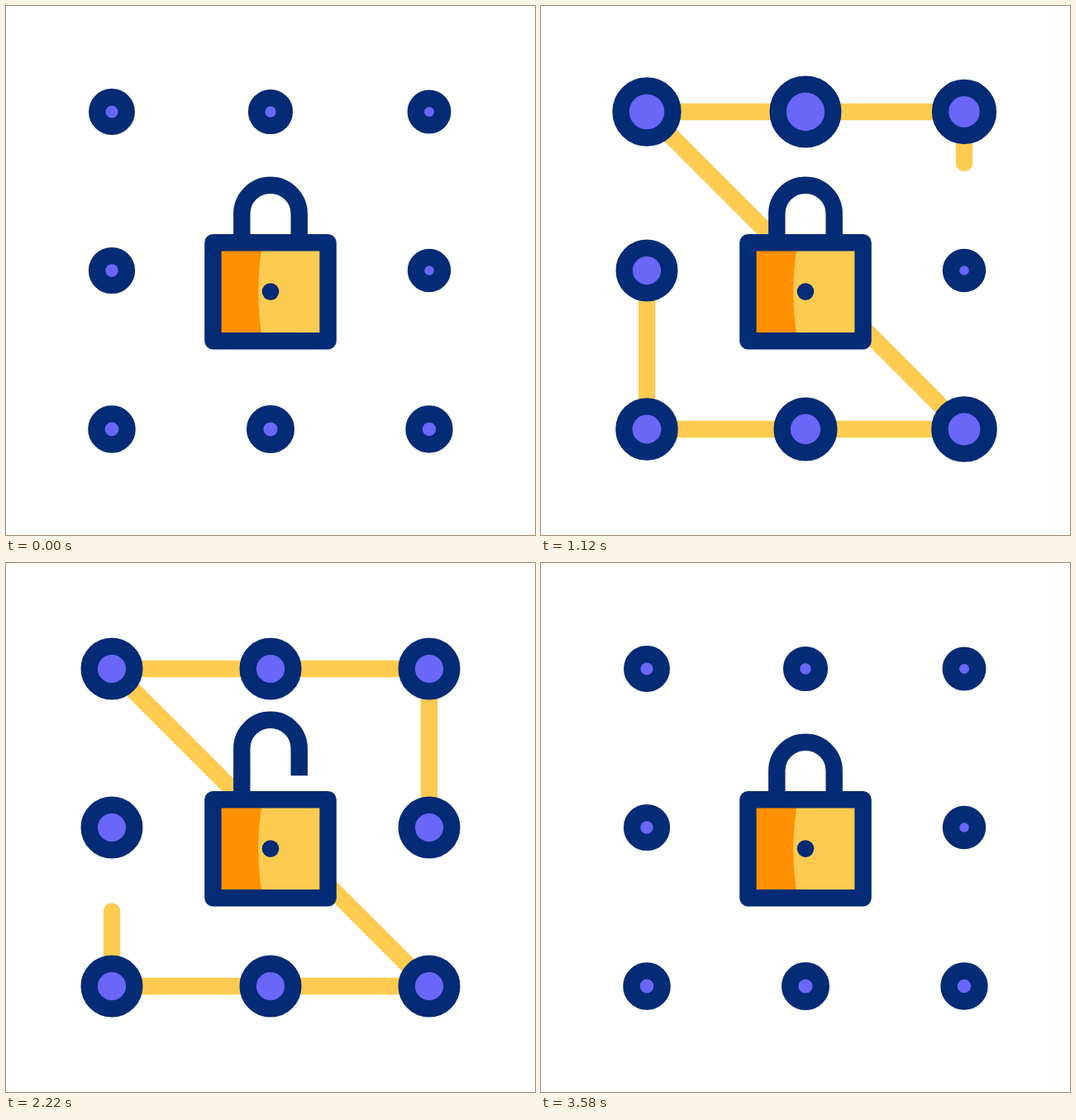
Recreate the animation shown at these times as an HTML page with a canvas. Size 640 px wide and 640 px high, loop 3600 ms.

```html
<!DOCTYPE html>
<html lang="en">
<head>
<meta charset="utf-8">
<title>Pattern unlock</title>
<style>
html, body { margin: 0; width: 100%; height: 100%; overflow: hidden; background: #fff; }
canvas { display: block; width: 640px; height: 640px; }
</style>
</head>
<body>
<canvas id="stage" width="640" height="640"></canvas>
<script>
const ctx = document.getElementById('stage').getContext('2d');
const LOOP = 3600, STROKE = 20.4, ON = 37.5;
const NAVY = '#042b75', PURPLE = '#6a66f8', YELLOW = '#fdcb50', ORANGE = '#ff9000';

// Cells of the 3 x 3 grid in the order the pattern visits them.
// Each pulse is shorter and lower than the one before; the last one is big and slow.
const dots = [...'36780125'].map((cell, i, { length }) => {
  const last = i === length - 1;
  const grow = 255 + 126 * i;
  const top = grow + (last ? 350 : 360 - 33 * i);
  return {
    x: 128 + 192 * (cell % 3),
    y: 128 + 192 * Math.floor(cell / 3),
    idle: 27.6 + 1.4 * Math.cos((i - 1.9) * Math.PI / 5),
    peak: last ? 51 : 47 - 0.6 * i,
    grow,
    top,
    settle: top + (last ? 570 : 520 - 55 * i),
    shrink: 2355 + 56 * i
  };
});
const pathLength = dots.slice(1).reduce(
  (sum, d, i) => sum + Math.hypot(d.x - dots[i].x, d.y - dots[i].y), 0);

// Eased 0..1 progress between two times
function ease(t, from, to) {
  const u = Math.min(1, Math.max(0, (t - from) / (to - from)));
  return u * u * (3 - 2 * u);
}

function drawPattern(t) {
  const head = ease(t, 298, 1288) * pathLength;
  const tail = ease(t, 2067, 3095) * pathLength;
  if (head - tail < 0.1) return;
  ctx.save();
  ctx.lineCap = 'round';
  ctx.strokeStyle = YELLOW;
  ctx.setLineDash([head - tail, pathLength * 2]);
  ctx.lineDashOffset = -tail;
  ctx.beginPath();
  dots.forEach(({ x, y }) => ctx.lineTo(x, y));
  ctx.stroke();
  ctx.restore();
}

function drawDot({ x, y, idle, peak, grow, top, settle, shrink }, t) {
  const r = idle
    + (peak - idle) * ease(t, grow, top)
    + (ON - peak) * ease(t, top, settle)
    + (idle - ON) * ease(t, shrink, Math.min(shrink + 1000, 3570));
  ctx.beginPath();
  ctx.arc(x, y, r - STROKE / 2, 0, Math.PI * 2);
  ctx.fillStyle = PURPLE;
  ctx.fill();
  ctx.stroke();
}

function drawLock(t) {
  const stretch = ease(t, 1400, 1600) - ease(t, 1600, 1800);
  const lift = 27 * (ease(t, 1620, 1900) - ease(t, 2733, 3233));
  const sx = 1 - 0.112 * stretch, sy = 1 + 0.069 * stretch;

  // Scales the path about the base of the lock while strokes keep their width
  const shape = build => {
    ctx.save();
    ctx.translate(320, 405.2);
    ctx.scale(sx, sy);
    ctx.beginPath();
    build();
    ctx.restore();
  };

  shape(() => {
    const y = -153.8 - lift;
    ctx.moveTo(-34.7, -115);
    ctx.lineTo(-34.7, y);
    ctx.arc(0, y, 34.7, Math.PI, 0);
    ctx.lineTo(34.7, -121 - lift);
  });
  ctx.stroke();

  const body = () => ctx.rect(-69.6, -119, 139.2, 119);
  shape(body);
  ctx.fillStyle = YELLOW;
  ctx.fill();
  shape(() => {
    const edge = -9.5 - 4.5 * stretch;
    ctx.moveTo(-69.6, -119);
    ctx.lineTo(edge, -119);
    ctx.quadraticCurveTo(edge - 10.5, -59.5, edge, 0);
    ctx.lineTo(-69.6, 0);
  });
  ctx.fillStyle = ORANGE;
  ctx.fill();
  shape(body);
  ctx.stroke();

  ctx.beginPath();
  ctx.arc(320, 405.2 - 59.6 * sy, 10.3, 0, Math.PI * 2);
  ctx.fillStyle = NAVY;
  ctx.fill();
}

function draw(now) {
  const t = now % LOOP;
  ctx.clearRect(0, 0, 640, 640);
  ctx.lineWidth = STROKE;
  ctx.lineJoin = 'round';
  ctx.strokeStyle = NAVY;
  drawPattern(t);
  dots.forEach(d => drawDot(d, t));
  drawLock(t);
}

let start;
function tick(now) {
  start ??= now;
  draw(now - start);
  requestAnimationFrame(tick);
}
draw(0);
requestAnimationFrame(tick);
</script>
</body>
</html>
```
